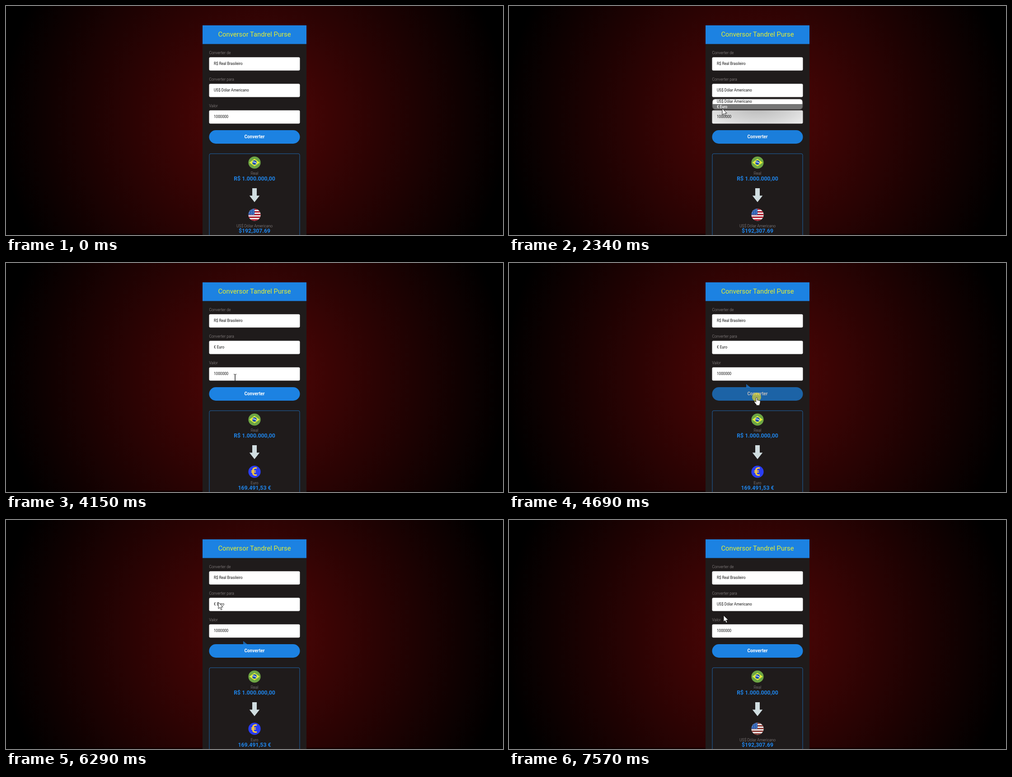
These frames come from a looping animation (1100 px wide and 509 px high, 8000 ms). An HTML page:

```html
<!DOCTYPE html>
<html lang="pt-BR">
<head>
<meta charset="utf-8">
<title>Conversor</title>
<style>
  html, body { margin: 0; width: 100%; height: 100%; overflow: hidden; background: #000; }
  svg { display: block; width: 1100px; height: 509px; font-family: Roboto, Arial, sans-serif; }
  .label { font-size: 8.55px; font-weight: 300; fill: #9a9494; }
  .value { font-size: 8.2px; fill: #111; }
  .money { font-size: 12.3px; font-weight: 700; fill: #1f83e6; }
  .mid { text-anchor: middle; }
  .field { fill: #fff; stroke: #c9c9c9; stroke-width: .5; }
</style>
</head>
<body>
<svg viewBox="0 0 1100 509">
  <defs>
    <radialGradient id="glow" gradientUnits="userSpaceOnUse" cx="550" cy="254" r="560">
      <stop stop-color="#540606"/><stop offset="1" stop-color="#000"/>
    </radialGradient>
    <radialGradient id="shade" gradientUnits="userSpaceOnUse" cx="0" cy="0" r="1"
      gradientTransform="translate(550 226) scale(150 58)">
      <stop stop-opacity=".27"/><stop offset=".5" stop-opacity=".17"/><stop offset="1" stop-opacity=".05"/>
    </radialGradient>
    <clipPath id="disc"><circle cx="550" cy="464" r="13.6"/></clipPath>
    <clipPath id="menuClip"><rect x="450" y="206.5" width="200" height="23" rx="6"/></clipPath>
  </defs>

  <rect width="1100" height="509" fill="url(#glow)"/>
  <rect y="506" width="1100" height="3" opacity=".5"/>
  <rect x="435" y="43" width="230" height="466" fill="#1f1b1b"/>
  <rect x="435" y="43" width="230" height="41.5" fill="#1c82e2"/>
  <text class="mid" x="550" y="68" font-size="14.8" fill="#e4ee32">Conversor Tandrel Purse</text>

  <text class="label" x="449.5" y="107">Converter de</text>
  <rect class="field" x="449.7" y="114" width="200.6" height="29.3" rx="2.5"/>
  <text class="value" x="460" y="131">R$ Real Brasileiro</text>

  <text class="label" x="449.5" y="166">Converter para</text>
  <rect class="field" x="449.7" y="173" width="200.6" height="29.3" rx="2.5"/>
  <text class="value" id="target" x="460" y="190"></text>

  <text class="label" x="449.5" y="225">Valor</text>
  <rect class="field" x="449.7" y="232" width="200.6" height="29.3" rx="2.5"/>
  <text class="value" x="460" y="249">1000000</text>

  <path id="nick" d="M525 269v8h10z" fill="#1d62a5"/>
  <g id="button">
    <rect x="449.5" y="276" width="201" height="30" rx="15" fill="#1c82e2"/>
    <text class="mid" x="550" y="293.5" font-size="10.1" font-weight="700" fill="#fff">Converter</text>
  </g>

  <rect x="450" y="328.3" width="200" height="200" rx="3" fill="none" stroke="#1f64aa"/>

  <circle cx="550" cy="348" r="13.6" fill="#6da544"/>
  <path d="M538.5 348L550 339.7 561.5 348 550 356.3z" fill="#e2ee3c"/>
  <circle cx="550" cy="348" r="4.9" fill="#1b50ae"/>
  <path d="M545.4 346.7q5.4-.8 9 3.4" fill="none" stroke="#fff" stroke-width="1.5"/>
  <text class="label mid" x="550" y="375.3">Real</text>
  <text class="money mid" x="550" y="388">R$ 1.000.000,00</text>

  <path d="M545 405h10v16.5h6.3L550 436 538.7 421.5h6.3z" fill="#d0dde0"/>

  <g id="usa" clip-path="url(#disc)">
    <rect x="536" y="450" width="28" height="28" fill="#f1efef"/>
    <g id="stripes"></g>
    <rect x="536" y="450" width="14" height="14.4" fill="#1f56ad"/>
    <g id="stars" fill="#f4f4f8"></g>
  </g>
  <g id="euro">
    <circle cx="550" cy="464" r="13.6" fill="#2a3df4"/>
    <text class="mid" x="549" y="473.3" font-size="26" font-weight="700" fill="#f8c93c">€</text>
  </g>
  <text class="label mid" id="coin" x="550" y="492.3"></text>
  <text class="money mid" id="sum" x="550" y="504"></text>

  <g id="menu">
    <rect x="450" y="232" width="200" height="61" fill="none"/>
    <rect x="449.7" y="232" width="200.6" height="29.3" rx="2.5" fill="url(#shade)"/>
    <rect x="449.5" y="276" width="201" height="30" rx="15" opacity=".03"/>
    <g id="list" clip-path="url(#menuClip)">
      <rect x="450" y="206" width="200" height="24" fill="#fff"/>
      <rect id="pick" x="450" width="200" height="11.6" fill="#757575"/>
      <text class="value" id="opt0" x="460" y="215">US$ Dólar Americano</text>
      <text class="value" id="opt1" x="460" y="226.5">€ Euro</text>
    </g>
    <rect x="450" y="206.5" width="200" height="23.3" rx="6.5" fill="none" stroke="#4a4747" stroke-width="1.3"/>
  </g>

  <g id="cursor">
    <circle id="tap" r="10" fill="#ffe61e" opacity=".6"/>
    <path id="arrow" d="M0 0v14.2l3.3-3 2.4 5.4 2.4-1-2.4-5.3h4.6z" fill="#fff" stroke="#111" stroke-width=".9"/>
    <path id="beam" d="M-3-8q3 0 3 2V6q0 2-3 2M3-8Q0-8 0-6V6q0 2 3 2" fill="none" stroke="#222"/>
    <path id="hand" d="M-1.3 1.7Q0 .2 1.3 1.7V7l1.9-.3.5.7 1.8-.1.5.8 1.5.2q.8.4.7 1.6l-.6 4-1.1 2.6v1.9H-.6v-1.6L-3.8 13l-1.3-2.7q.5-1.6 2-.7l1.8 1.7z" fill="#fff" stroke="#111" stroke-width=".8"/>
  </g>
</svg>
<script>
const LOOP = 8000, STEP = 67.05, START = 390;
const $ = id => document.getElementById(id);
const show = (id, on) => $(id).style.display = on ? '' : 'none';
const within = (t, ...spans) => spans.some(([a, b]) => t >= a && t < b);

// time, x, y; a trailing 1 means constant speed up to that point
const path = [
  [390, 999, 465], [860, 280, 148], [1130, 475, 187], [1260, 478, 188],
  [1670, 478, 188], [2140, 472, 229],
  [2270, 472, 229], [2540, 471, 221],
  [3060, 471, 221], [3470, 486, 253], [3740, 484, 238],
  [3885, 484, 238], [4350, 525, 269, 1], [4485, 548, 298, 1],
  [5485, 548, 298], [6290, 470, 183],
  [6560, 470, 183], [6820, 478, 216], [6890, 478, 219],
  [7025, 478, 219], [7230, 475, 212], [8000, 475, 212]
];

function pointer(t) {
  const q = START + Math.floor((t - START + 10) / STEP) * STEP;
  const i = Math.max(1, path.findIndex(p => p[0] >= q));
  const [ta, xa, ya] = path[i - 1], [tb, xb, yb, linear] = path[i];
  const u = Math.min(1, Math.max(0, (q - ta) / (tb - ta)));
  const k = linear ? u : u * u * (3 - 2 * u);
  return [xa + (xb - xa) * k, ya + (yb - ya) * k];
}

function add(parent, tag, attrs) {
  const el = document.createElementNS('http://www.w3.org/2000/svg', tag);
  for (const key in attrs) el.setAttribute(key, attrs[key]);
  $(parent).append(el);
}
for (let i = 0; i < 5; i++)
  add('stripes', 'rect', { x: 536, y: 450 + i * 6, width: 28, height: 3.1 });
for (let i = 0; i < 12; i++)
  add('stars', 'circle', { cx: 539 + i % 3 * 4 + (i / 3 & 1), cy: 452 + (i / 3 | 0) * 3.6, r: .8 });

function draw(t) {
  const [x, y] = pointer(t);
  const euro = within(t, [2740, 7570]);
  const open = within(t, [1670, 2740], [6560, 7570]);
  const unfilled = within(t, [1670, 1730], [6560, 6620]);
  const inside = x > 449 && x < 651;
  const hover = t >= START && inside && y >= 276 && y <= 306;
  const pressed = within(t, [4690, 4820]);
  const typing = inside && y >= 232 && y <= 261;

  $('target').textContent = euro ? '€ Euro' : 'US$ Dólar Americano';
  $('coin').textContent = euro ? 'Euro' : 'US$ Dólar Americano';
  $('sum').textContent = euro ? '169.491,53 €' : '$192,307.69';
  show('euro', euro);
  show('usa', !euro);
  $('stripes').setAttribute('fill', t >= 7570 ? '#8b3a34' : '#b01e2f');

  show('menu', open);
  show('list', !unfilled);
  const row = y < 206 ? +euro : +(y >= 218);
  $('pick').setAttribute('y', 206.3 + row * 11.7);
  [0, 1].forEach(i => {
    $('opt' + i).style.fill = i === row ? '#fff' : '#111';
    $('opt' + i).style.fontWeight = i === row ? 500 : 400;
  });

  $('button').setAttribute('opacity', pressed ? .7 : hover ? .8 : 1);
  show('nick', within(t, [4420, 6560]));

  show('cursor', t >= START);
  $('cursor').setAttribute('transform', `translate(${Math.round(x)} ${Math.round(y)})`);
  show('tap', within(t, [1670, 1800], [2540, 2740], [4690, 4820], [6560, 6690], [7430, 7570]));
  show('hand', hover);
  show('beam', typing);
  show('arrow', !hover && !typing);
}

function tick() {
  draw(performance.now() % LOOP);
  requestAnimationFrame(tick);
}
tick();
</script>
</body>
</html>
```
